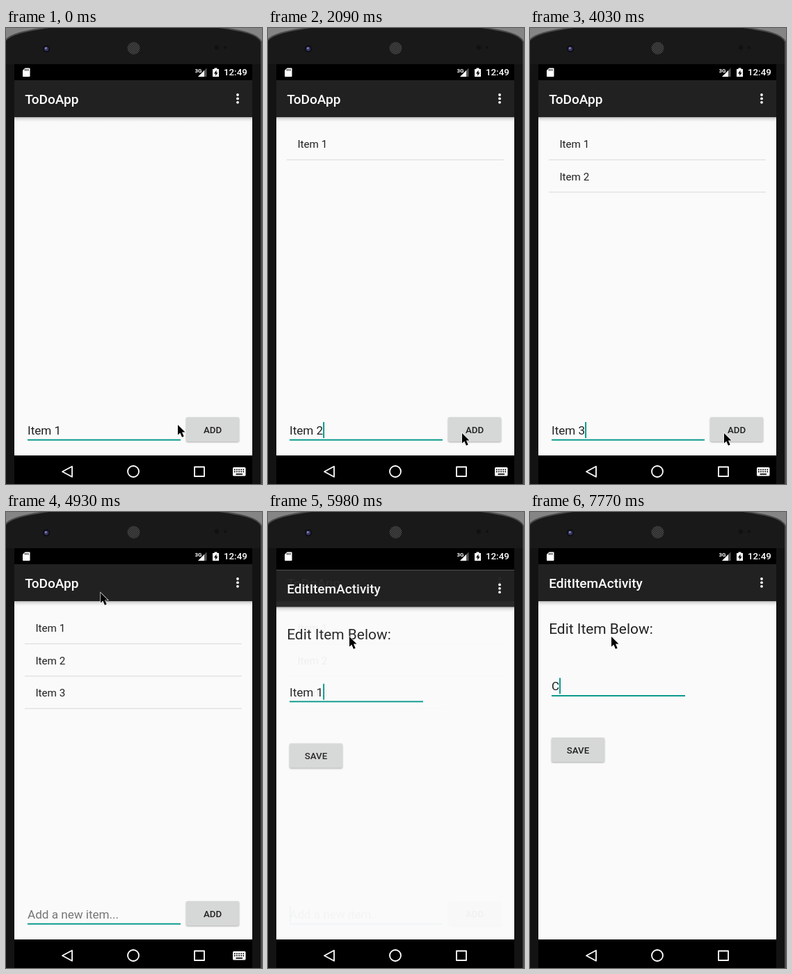
An HTML page that plays this animation: 368x655 px, repeating every 8000 ms.

```html
<!DOCTYPE html>
<html lang="en">
<head>
<meta charset="utf-8">
<title>ToDoApp</title>
<style>
  html, body { margin: 0; width: 100%; height: 100%; overflow: hidden; background: #131313; }
  svg { display: block; width: 100vw; height: 100vh; }
  text { font-family: Roboto, sans-serif; white-space: pre; fill: #212121; }
  .title { font-size: 19px; font-weight: 500; fill: #fff; }
  .label { font-size: 20.9px; }
  .field { font-size: 17.1px; }
  .item { font-size: 15.2px; }
  .button { font-size: 13.3px; font-weight: 500; text-anchor: middle; }
  .accent { fill: #009688; }
  .raised { fill: #d6d7d7; filter: drop-shadow(0 1px 1px rgba(0,0,0,.32)); }
  .pressed { fill: #c9caca; filter: drop-shadow(0 2px 2px rgba(0,0,0,.38)); }
</style>
</head>
<body>
<svg viewBox="0 0 368 655">
  <defs>
    <linearGradient id="shade" x2="0" y2="1">
      <stop stop-color="#000" stop-opacity=".28"/>
      <stop offset=".4" stop-color="#000" stop-opacity=".09"/>
      <stop offset="1" stop-color="#000" stop-opacity="0"/>
    </linearGradient>
    <pattern id="mesh" width="3" height="3" patternUnits="userSpaceOnUse">
      <rect width="3" height="3" fill="#222"/>
      <circle cx="1" cy="1" r=".8" fill="#666"/>
      <circle cx="2.5" cy="2.5" r=".7" fill="#555"/>
    </pattern>
    <clipPath id="screen"><rect x="12" y="52" width="342" height="562"/></clipPath>
    <clipPath id="firstRow"><rect x="27" y="143" width="312" height="46"/></clipPath>
  </defs>

  <!-- Phone body -->
  <rect width="368" height="655" fill="#858585"/>
  <path d="M-2 655V20C3 9 28 4 62 -1H306C340 4 362 8 367 20V655Z" fill="#191919" stroke="#4b4b4b" stroke-width="2"/>
  <path d="M0 52H12V655H0ZM354 52H366V655H354Z" fill="#131313"/>
  <circle cx="58" cy="30" r="5" fill="#0b0b12"/>
  <circle cx="58" cy="30" r="3.3" fill="#34335c"/>
  <circle cx="57.3" cy="29" r="1.5" fill="#8886b4"/>
  <circle cx="183.5" cy="29" r="9" fill="url(#mesh)"/>
  <circle cx="303" cy="28" r="3.2" fill="#111"/>
  <circle cx="315" cy="28" r="2" fill="#111"/>

  <g clip-path="url(#screen)">
    <g id="listScreen"></g>
    <g id="editScreen"></g>
  </g>

  <!-- Status bar -->
  <rect x="12" y="52" width="342" height="23"/>
  <g fill="#fff">
    <path d="M27.5 57.5H33.5Q34.5 57.5 34.5 58.5V69Q34.5 70 33.5 70H25Q24 70 24 69V61Z"/>
    <path d="M27.5 59V61.5M29.7 59V61.5M31.9 59V61.5" stroke="#000"/>
    <path d="M288.500 57.500V70H276Z" fill="#555"/>
    <path d="M285 61V70H276Z"/>
    <text x="271.500" y="63.500" style="font-size:8px;font-weight:700;fill:#fff">3G</text>
    <path d="M299.500 57.500H303.500V59H306V70H297V59H299.500Z"/>
    <path d="M302.500 60.500L299 65.500H301.200V69L304.500 64H302.500Z" fill="#000"/>
    <text x="313" y="68.300" style="font-size:13.3px;font-weight:500;fill:#fff">12:49</text>
  </g>

  <!-- Navigation bar -->
  <rect x="12" y="614" width="342" height="41"/>
  <g fill="none" stroke="#fff" stroke-width="1.8" stroke-linejoin="round">
    <path d="M81 637.3L95 629.8V644.8Z"/>
    <circle cx="183" cy="637" r="8"/>
    <rect x="271" y="630.500" width="14" height="13.500"/>
  </g>
  <g id="keyboard">
    <rect x="326" y="631" width="18.500" height="12.500" rx="1.500" fill="#fff"/>
    <path d="M328 634.300H343M328 637.300H343" stroke="#000" stroke-width="1.700" stroke-dasharray="1.700 1.400"/>
    <path d="M330.500 640.800H340" stroke="#000" stroke-width="1.700"/>
  </g>

  <path id="pointer" d="M0 0V14.500L3.300 11.500L6 17.700L8.700 16.500L6 10.500H10.500Z" stroke="#fff" stroke-width="1.200" paint-order="stroke"/>
</svg>

<script>
const LOOP = 8000;
const $ = id => document.getElementById(id);

const appBar = title => `
  <rect x="12" y="52" width="342" height="23"/>
  <rect x="12" y="75" width="342" height="600" fill="#fafafa"/>
  <rect x="12" y="75" width="342" height="53" fill="#212121"/>
  <rect x="12" y="128" width="342" height="7" fill="url(#shade)"/>
  <text class="title" x="27.2" y="109">${title}</text>
  ${[96, 101.4, 106.8].map(y => `<circle cx="333" cy="${y}" r="1.9" fill="#fff"/>`).join('')}`;

const field = (id, baseline, width) => `
  <text class="field" id="${id}Text" x="31" y="${baseline}"></text>
  <rect class="accent" x="31" y="${baseline + 6.7}" width="${width}" height="1.9"/>
  <rect class="accent" id="${id}Caret" y="${baseline - 18}" width="1.9" height="23"/>`;

const button = (id, x, y, label) => `
  <rect class="raised" id="${id}" x="${x}" y="${y}" width="76" height="35" rx="2"/>
  <text class="button" x="${x + 38}" y="${y + 22.6}">${label}</text>`;

const row = i => `
  <g class="row">
    <text class="item" x="42.4" y="${172 + i * 46.5}">Item ${i + 1}</text>
    <rect x="27" y="${188.8 + i * 46.5}" width="312" height="1" fill="#d9d9d9"/>
  </g>`;

$('listScreen').innerHTML = appBar('ToDoApp') + [0, 1, 2].map(row).join('') +
  '<circle id="ripple" cx="136.500" cy="167" r="79" fill-opacity=".09" clip-path="url(#firstRow)"/>' +
  field('draft', 584, 220) + button('add', 259, 559, 'ADD');
$('editScreen').innerHTML = appBar('EditItemActivity') +
  '<text class="label" x="27.2" y="175">Edit Item Below:</text>' +
  field('edit', 256.3, 192) + button('save', 31, 324, 'SAVE');

const rows = [...document.querySelectorAll('.row')];

// Each track lists [start time, value...]; a value holds until the next entry.
const draftTrack = [
  [0, 'Item 1'], [450, ''],
  [1040, 'I'], [1340, 'It'], [1490, 'Ite'], [1640, 'Item'], [1790, 'Item '], [2090, 'Item 2'], [2540, ''],
  [3130, 'I'], [3280, 'It'], [3430, 'Ite'], [3580, 'Item'], [3730, 'Item '], [4030, 'Item 3'], [4480, '']
];
const draftCaretTrack = [[0, false], [450, true], [890, false], [1040, true], [4930, false], [5530, true]];
const editTrack = [
  [0, 'Item 1'], [6580, 'Item '], [6730, 'Item'], [6880, 'Ite'],
  [7020, 'It'], [7170, 'I'], [7320, ''], [7770, 'C']
];
const editCaretTrack = [[0, true], [6280, false], [6580, true]];
const countTrack = [[0, 0], [450, 1], [2540, 2], [4480, 3]];
const pressTrack = [[0, false], [450, true], [600, false], [2540, true], [2680, false], [4480, true], [4630, false]];
const pointerTrack = [
  [0, 247, 570], [150, 264, 577], [300, 279, 582],
  [4780, 205, 330], [4930, 136, 116], [5080, 122, 161], [5230, 117, 179]
];
// Offset and opacity of the edit screen as it slides in.
const enterTrack = [[0, 45, 0], [5830, 35.3, .3], [5980, 8.4, .955], [6130, 1, 1], [6280, 0, 1]];

const at = (track, time) => track.findLast(entry => entry[0] <= time).slice(1);
const show = (node, visible) => node.setAttribute('visibility', visible ? 'visible' : 'hidden');

function setField(id, value, caretOn, hint = '') {
  const text = $(id + 'Text');
  text.textContent = value || hint;
  text.style.fill = value ? '#212121' : '#757575';
  $(id + 'Caret').setAttribute('x', 31 + (value ? text.getComputedTextLength() : 0));
  show($(id + 'Caret'), caretOn);
}

function draw(time) {
  const [count] = at(countTrack, time);
  const [pressed] = at(pressTrack, time);
  const [offset, opacity] = at(enterTrack, time);

  rows.forEach((node, i) => show(node, i < count));
  setField('draft', at(draftTrack, time)[0], at(draftCaretTrack, time)[0], 'Add a new item...');
  setField('edit', at(editTrack, time)[0], at(editCaretTrack, time)[0]);
  $('add').setAttribute('class', pressed ? 'pressed' : 'raised');
  show($('ripple'), time >= 5830 && time < 5980);
  show($('keyboard'), time < 5830);
  $('editScreen').setAttribute('transform', `translate(0 ${offset})`);
  $('editScreen').setAttribute('opacity', opacity);
  $('pointer').setAttribute('transform', `translate(${at(pointerTrack, time)})`);
}

const start = performance.now();
function tick() {
  draw((performance.now() - start) % LOOP);
  requestAnimationFrame(tick);
}
tick();
</script>
</body>
</html>
```
